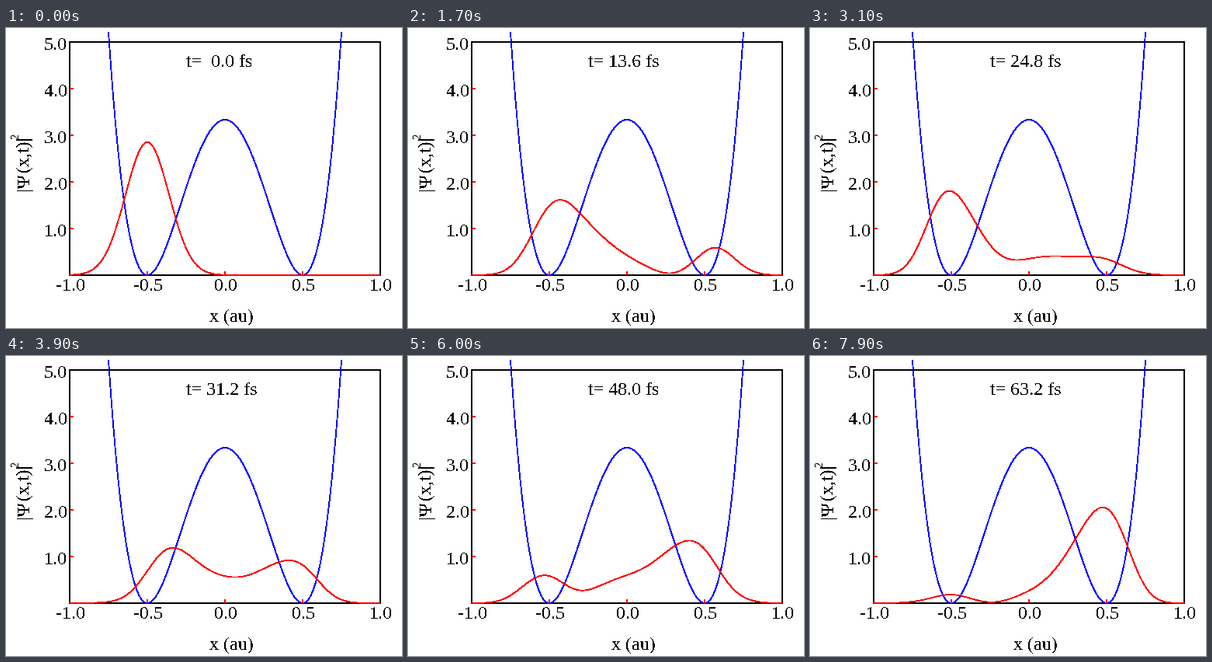
Recreate the animation shown at these times as a matplotlib script. Size 510 by 386 pixels, loop 8 s.

```python
import numpy as np
import matplotlib.pyplot as plt
from matplotlib.animation import FuncAnimation

W, H, DPI = 510, 386, 64
PX = 72 / DPI                      # points per pixel
FRAMES, INTERVAL, FS_STEP = 80, 100, 0.8
AU_PER_FS = 41.341
LEFT, RIGHT, TOP, BASE = 82, 482, 18, 318

plt.rcParams.update({
    "font.family": "Liberation Serif",
    "text.antialiased": False,
    "lines.antialiased": False,
    "lines.solid_capstyle": "butt",
    "lines.solid_joinstyle": "miter",
})

# Key crests of the packet: time in fs, x, density
CRESTS = np.array([
    (0, -0.5, 2.85), (8, -0.373, 1.81), (18.4, -0.445, 2.04),
    (31.2, -0.335, 1.185), (31.2, 0.405, 0.92), (40, 0.505, 1.595),
    (48, -0.53, 0.60), (48, 0.40, 1.345), (63.2, 0.475, 2.05),
])


# --- Quantum motion in a quartic double well, sine basis in a wide box ---
BOX, MODES = 1.2, 40
K = np.arange(1, MODES + 1) * np.pi / (2 * BOX)
GRID = np.linspace(-BOX, BOX, 481)
DX = GRID[1] - GRID[0]


def well(x):
    return (4 * x**2 - 1) ** 2


def sines(x):
    return np.sin(np.outer(x + BOX, K)) / np.sqrt(BOX)


S = sines(GRID)
WELL = S.T @ (well(GRID)[:, None] * S) * DX


def solve(q):
    """Energies, eigenvectors and amplitudes for barrier, mass, width, kick."""
    barrier, mass, width, kick = q * (0.0073, 1836, 0.14, 1)
    psi = np.exp(-((GRID + 0.5) / (2 * width)) ** 2 + 1j * kick * GRID)
    psi /= np.sqrt((abs(psi) ** 2).sum() * DX)
    energy, vecs = np.linalg.eigh(np.diag(K**2 / (2 * mass)) + barrier * WELL)
    return energy, vecs, vecs.T @ (S.T @ psi) * DX


def density(state, basis, t):
    energy, vecs, amp = state
    phase = np.exp(-1j * np.outer(t, energy) * AU_PER_FS)
    return abs(((basis @ vecs) * (amp * phase)).sum(axis=1)) ** 2


# --- Fit barrier, mass, width and kick to the crests ---
crest_t, crest_x, crest_d = CRESTS.T
probe_t = np.tile(crest_t, 3)
probe_basis = sines(np.concatenate([crest_x, crest_x - 0.025, crest_x + 0.025]))


def miss(q):
    """Height error and leftover slope at each crest."""
    mid, left, right = density(solve(q), probe_basis, probe_t).reshape(3, -1)
    return np.concatenate([mid - crest_d, right - left])


def cost(q):
    return (miss(q) ** 2).sum()


def refine(q, steps=25, h=1e-4):
    damp, r = 0.01, miss(q)
    for _ in range(steps):
        jac = np.column_stack([(miss(q + e) - r) / h for e in h * np.eye(4)])
        a = jac.T @ jac
        trial = q - np.linalg.solve(a + damp * np.diag(np.diag(a)), jac.T @ r)
        new = miss(trial)
        if new @ new < r @ r:
            q, r, damp = trial, new, damp / 4
        else:
            damp *= 4
    return q


starts = [np.array([b, m, 1, 0])
          for b in np.linspace(0.65, 1.75, 24)
          for m in np.linspace(0.6, 1.35, 22)]
best = min((refine(q) for q in sorted(starts, key=cost)[:4]), key=cost)
state = solve(best)


# --- Drawing, in pixel coordinates ---
fig = plt.figure(figsize=(W / DPI, H / DPI), dpi=DPI, facecolor="white")
ax = fig.add_axes([0, 0, 1, 1])
ax.set(xlim=(0, W), ylim=(H, 0))
ax.axis("off")


def px(x):
    return 282 + 200 * x


def py(y):
    return BASE - 60 * y


def line(x, y, color, width=2):
    return ax.plot(x, y, color=color, lw=width * PX)[0]


def curve(x, y, color):
    # Aliased slanted strokes fill every pixel they touch, so draw them thin
    return line(px(x), py(y), color, 0.8)


def label(x, y, s, size=24, **kw):
    return ax.text(x, y, s, fontsize=size * PX, va="baseline", **kw)


def upright(x, y, s, **kw):
    return label(x, y, s, rotation=90, rotation_mode="anchor", **kw)


line([LEFT, RIGHT, RIGHT, LEFT, LEFT, RIGHT],
     [BASE, BASE, TOP, TOP, BASE, BASE], "black")
xs = np.linspace(-0.75, 0.75, 301)
curve(xs, well(xs) * 10 / 3, "#0000ff")

for v in (-1, -0.5, 0, 0.5, 1):
    label(px(v) + 1, 338, f"{v:.1f}", ha="center")
    if abs(v) < 1:
        line([px(v)] * 2, [BASE, BASE - 5], "#ff0000")
for v in range(1, 6):
    label(79, py(v) + 10, f"{v:.1f}", ha="right")
    if v < 5:
        line([LEFT, LEFT + 5], [py(v)] * 2, "#ff0000")

label(262, 378, "x (au)")
upright(29, 209, "|Ψ")
upright(29, 140, "(x,t)|", ha="right")
upright(16, 142, "2", size=14)
clock = label(232, 50, "")

xr = np.linspace(-1, 1, 401)
plot_basis = sines(xr)
packet = curve(xr, 0 * xr, "#ff0000")


def update(i):
    t = i * FS_STEP
    packet.set_ydata(py(density(state, plot_basis, t)))
    clock.set_text(f"t={t:5.1f} fs")
    return packet, clock


anim = FuncAnimation(fig, update, frames=FRAMES, interval=INTERVAL,
                     repeat=True, blit=False)
plt.show()
```
